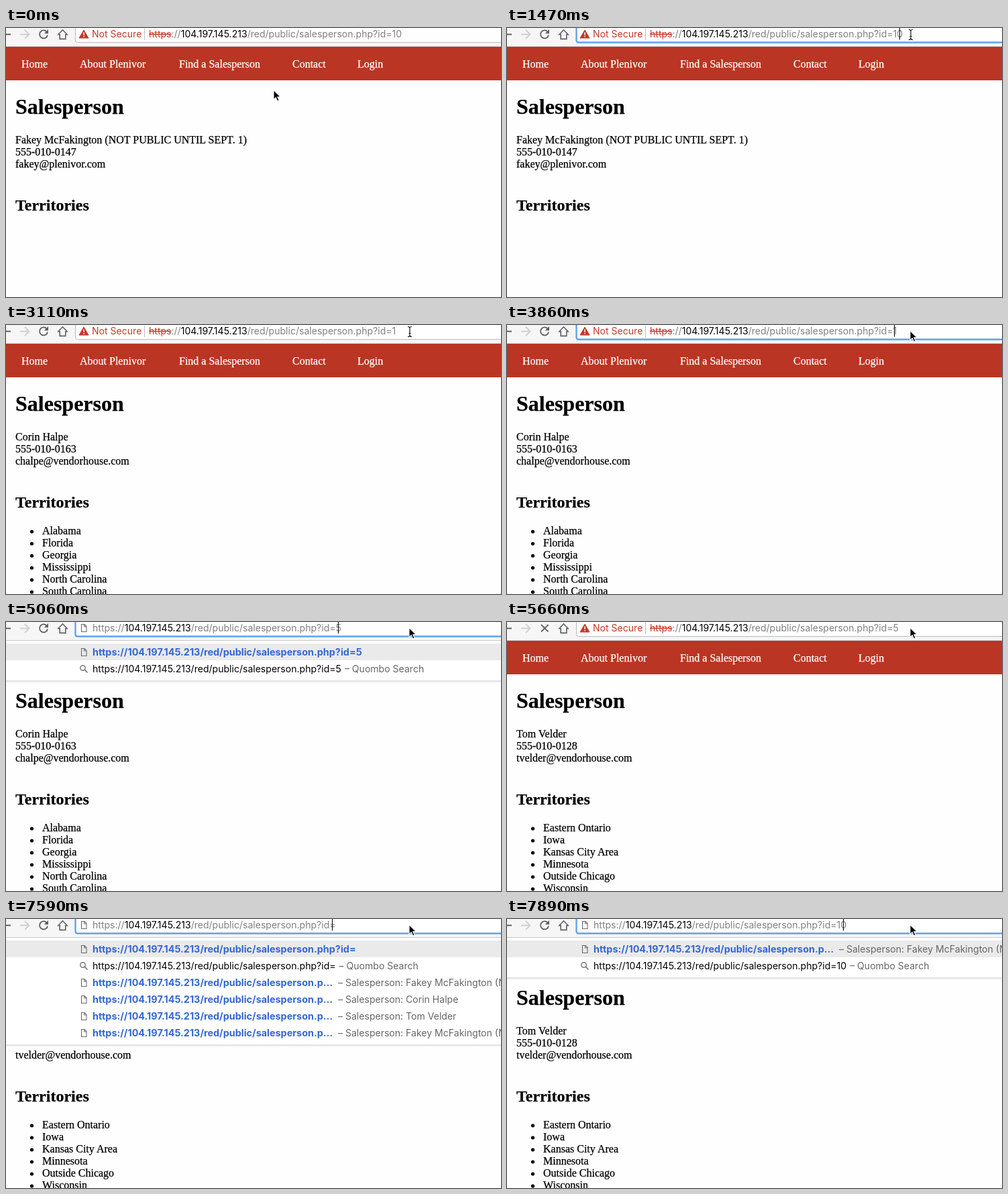
Animation of 738x401 px, one loop 8 s. Source, as an HTML page:

```html
<!DOCTYPE html>
<html lang="en">
<head>
<meta charset="utf-8">
<style>
  html, body { margin: 0; width: 100%; height: 100%; overflow: hidden; background: #fff; }
  svg { display: block; }
  text { white-space: pre; stroke-width: 0; }
  .ui { font: 14.05px Inter, Roboto, sans-serif; }
  .bold { font: 700 14.4px Inter, Roboto, sans-serif; }
  .page { font: 16px "Liberation Serif", "Times New Roman", serif; stroke-width: .25px; }
  .h1 { font-weight: bold; font-size: 32px; }
  .h2 { font-weight: bold; font-size: 24px; }
  .strike { text-decoration: line-through; }
</style>
</head>
<body>
<svg id="stage" width="738" height="401" viewBox="0 0 738 401"></svg>
<script>
const LOOP = 8000;
const RED = '#c53929', GREY = '#808080', ICON = '#5f6063', BLUE = '#3367d6';
const stage = document.getElementById('stage');

const people = {
  10: { lines: ['Fakey McFakington (NOT PUBLIC UNTIL SEPT. 1)', '555-010-0147', 'fakey@plenivor.com'], places: [] },
  1: { lines: ['Corin Halpe', '555-010-0163', 'chalpe@vendorhouse.com'],
       places: ['Alabama', 'Florida', 'Georgia', 'Mississippi', 'North Carolina', 'South Carolina'] },
  5: { lines: ['Tom Velder', '555-010-0128', 'tvelder@vendorhouse.com'],
       places: ['Eastern Ontario', 'Iowa', 'Kansas City Area', 'Minnesota', 'Outside Chicago', 'Wisconsin'] }
};
const nav = [[23, 'Home'], [110, 'About Plenivor'], [258, 'Find a Salesperson'], [427, 'Contact'], [524, 'Login']];

// Width of the address for each id being shown
const urlWidth = { '': 357, 1: 364, 5: 366, 10: 372 };
const address = 'https://104.197.145.213/red/public/salesperson.php?id=';
const shortAddress = 'https://104.197.145.213/red/public/salesperson.p…';

// Each step changes some fields of the state and keeps the others
const steps = [
  [0, { page: 10, id: '10', mode: 'unsafe', focus: 0, selected: 0, caret: 0, rows: 0, busy: 0, pointer: 'arrow', x: 399, y: 92.5 }],
  [150, { x: 402, y: 89 }],
  [300, { x: 424, y: 76 }],
  [450, { x: 470, y: 57 }],
  [600, { x: 526, y: 39 }],
  [750, { x: 570, y: 27 }],
  [880, { x: 590, y: 20, pointer: 'beam' }],
  [1030, { x: 597, y: 18 }],
  [1180, { focus: 1, selected: 1 }],
  [1330, { selected: 0, x: 602, y: 10 }],
  [1470, { caret: 1 }],
  [1920, { mode: 'edit', id: '1', rows: 3 }],
  [2220, { mode: 'info', focus: 0, caret: 0, rows: 0, busy: 1 }],
  [2520, { mode: 'unsafe' }],
  [2670, { page: 1 }],
  [3110, { busy: 0 }],
  [3410, { focus: 1, selected: 1, pointer: 'arrow', x: 601, y: 8.5 }],
  [3860, { selected: 0, caret: 1 }],
  [4160, { mode: 'edit', id: '', rows: 6 }],
  [4610, { caret: 0 }],
  [5060, { id: '5', caret: 1, rows: 2 }],
  [5360, { mode: 'info', focus: 0, caret: 0, rows: 0, busy: 1 }],
  [5510, { mode: 'unsafe' }],
  [5660, { page: 5 }],
  [5810, { busy: 0 }],
  [6700, { focus: 1, selected: 1 }],
  [7300, { selected: 0, caret: 1 }],
  [7450, { mode: 'edit', id: '', rows: 6 }],
  [7740, { id: '1', rows: 3 }],
  [7890, { id: '10', rows: 2 }]
];

const text = (x, y, str, fill = '#000', cls = 'ui') =>
  `<text x="${x}" y="${y}" fill="${fill}" stroke="${fill}" class="${cls}">${str}</text>`;
const span = (str, fill, more = '') => `<tspan fill="${fill}" ${more}>${str}</tspan>`;
const rect = (x, y, w, h, fill, more = '') =>
  `<rect x="${x}" y="${y}" width="${w}" height="${h}" fill="${fill}" ${more}/>`;
const line = (d, stroke, width = 1.6) =>
  `<path d="${d}" fill="none" stroke="${stroke}" stroke-width="${width}"/>`;
const shape = (d, fill, more = '') => `<path d="${d}" fill="${fill}" ${more}/>`;

const docIcon = y => line(`M112.5 ${y - 5.5}h4.5l3 3v8h-7.5zM116.7 ${y - 5.5}v3.5h3.3`, '#6a6a6a', 1.1);
const lensIcon = y => `<circle cx="114.5" cy="${y - 1.5}" r="3.7" fill="none" stroke="#777" stroke-width="1.5"/>` +
  line(`M117.2 ${y + 1.2}l4.3 4.3`, '#777', 1.7);

function drawPage(s) {
  const { lines, places } = people[s.page];
  return rect(0, 28, 738, 50, '#ba3523') +
    nav.map(([x, label]) => text(x, 59, label, '#fff', 'page')).join('') +
    text(14, 128, 'Salesperson', '#000', 'page h1') +
    lines.map((str, i) => text(14, 172 + 18 * i, str, '#000', 'page')).join('') +
    text(14, 272, 'Territories', '#000', 'page h2') +
    places.map((str, i) => `<circle cx="38.5" cy="${308 + 18 * i}" r="2.6"/>` +
      text(54, 312 + 18 * i, str, '#000', 'page')).join('');
}

function drawButtons(busy) {
  const reload = busy
    ? line('M51 4l10.5 10.5M61.5 4L51 14.5', ICON, 1.8)
    : line('M60.6 5.4A6 6 0 1 0 62 10.5', ICON, 1.8) + shape('M63 2v6.2h-6.2z', ICON);
  return line('M7 9.5H-6M0 3l-6 6.5', ICON, 1.8) +
    line('M21 9.5h13M28 3l6.5 6.5L28 16', '#cfcfcf', 1.8) + reload +
    line('M84.5 2.8l-6.6 7h2.3v6.6h8.6v-6.6h2.3z', ICON, 1.6);
}

function drawAddress(s) {
  const unsafe = s.mode === 'unsafe';
  const x = unsafe ? 213 : 129;
  const end = x + urlWidth[s.id];
  let out = s.focus
    ? rect(103.5, -10, 660, 31.5, '#fff', 'rx="3" stroke="#62a3e8" stroke-width="2.4"')
    : rect(103.5, -10, 660, 31.5, '#fff', 'rx="3" stroke="#b9b9b9"');
  if (s.selected) out += rect(x, 0, end - x, 17, '#a0c8f5');
  if (unsafe) {
    out += shape('M116 3l7 12h-14z', RED, `stroke="${RED}" stroke-linejoin="round"`) +
      rect(115.3, 6.5, 1.5, 4.3, '#fff') + rect(115.3, 12, 1.5, 1.5, '#fff') +
      text(128, 14, 'Not Secure', RED) + rect(206, 1, 1, 17, '#bdbdbd');
  } else if (s.mode === 'info') {
    out += `<circle cx="116" cy="9.5" r="5.9" fill="none" stroke="${ICON}" stroke-width="1.3"/>` +
      rect(115.3, 8.7, 1.5, 4, ICON) + rect(115.3, 6, 1.5, 1.5, ICON);
  } else {
    out += docIcon(9);
  }
  const scheme = unsafe ? span('https', RED, 'class="strike"') : 'https';
  out += text(x, 14, scheme + '://' + span('104.197.145.213', '#000') +
    '/red/public/salesperson.php?id=' + s.id, s.selected ? '#5b6b80' : GREY);
  if (s.caret) out += rect(end, 0, 1, 17.5, '#000');
  return out;
}

function drawRows(s) {
  if (!s.rows) return '';
  const bottom = 37 + 25 * s.rows;
  const titled = id => text(129, 0, shortAddress, BLUE, 'bold') +
    text(495, 0, '– Salesperson: ' + people[id].lines[0], '#666');
  const others = s.id === '1' ? [10] : [10, 1, 5, 10];
  let out = rect(0, bottom, 738, 4, 'url(#shade)') + rect(0, 28, 738, bottom - 28, '#fff') +
    rect(0, 32, 738, 25, '#eaeaea');
  for (let i = 0; i < s.rows; i++) {
    const y = 50 + 25 * i;
    let row;
    if (i === 1) {
      row = text(129, 0, address + s.id + span('– Quombo Search', '#666', 'dx="5"'));
    } else if (i) {
      row = titled(others[i - 2]);
    } else {
      row = s.id === '10' ? titled(10) : text(129, 0, address + s.id, BLUE, 'bold');
    }
    out += (i === 1 ? lensIcon : docIcon)(y - 5) + `<g transform="translate(0 ${y})">${row}</g>`;
  }
  return out;
}

function drawPointer(s) {
  const beam = 'M-3-7.5q3 0 3 2q0-2 3-2M0-6V6M-3 7.5q3 0 3-2q0 2 3 2M-1.5 2.5h3';
  const mark = s.pointer === 'arrow'
    ? shape('M0 0v14.2l3.3-3.1 2.4 5.5 2.5-1.1-2.4-5.3h4.5z', '#000', 'stroke="#fff" stroke-width="1.1"')
    : line(beam, '#fff', 2.6) + line(beam, '#111', 1.2);
  return `<g transform="translate(${s.x} ${s.y})">${mark}</g>`;
}

const shade = `<defs><linearGradient id="shade" x2="0" y2="1">
  <stop stop-color="#dcdcdc"/><stop offset="1" stop-color="#fefefe"/></linearGradient></defs>`;

function draw(s) {
  stage.innerHTML = shade + rect(0, 0, 738, 401, '#fefefe') + drawPage(s) +
    rect(0, 0, 738, 27, '#f6f6f6') + rect(0, 27, 738, 1, '#c9c6c6') +
    drawButtons(s.busy) + drawAddress(s) + drawRows(s) + drawPointer(s);
}

let shown = 0;
function tick() {
  const t = performance.now() % LOOP;
  const passed = steps.filter(([at]) => at <= t);
  if (passed.length !== shown) {
    shown = passed.length;
    draw(Object.assign({}, ...passed.map(([, change]) => change)));
  }
  requestAnimationFrame(tick);
}
tick();
</script>
</body>
</html>
```
